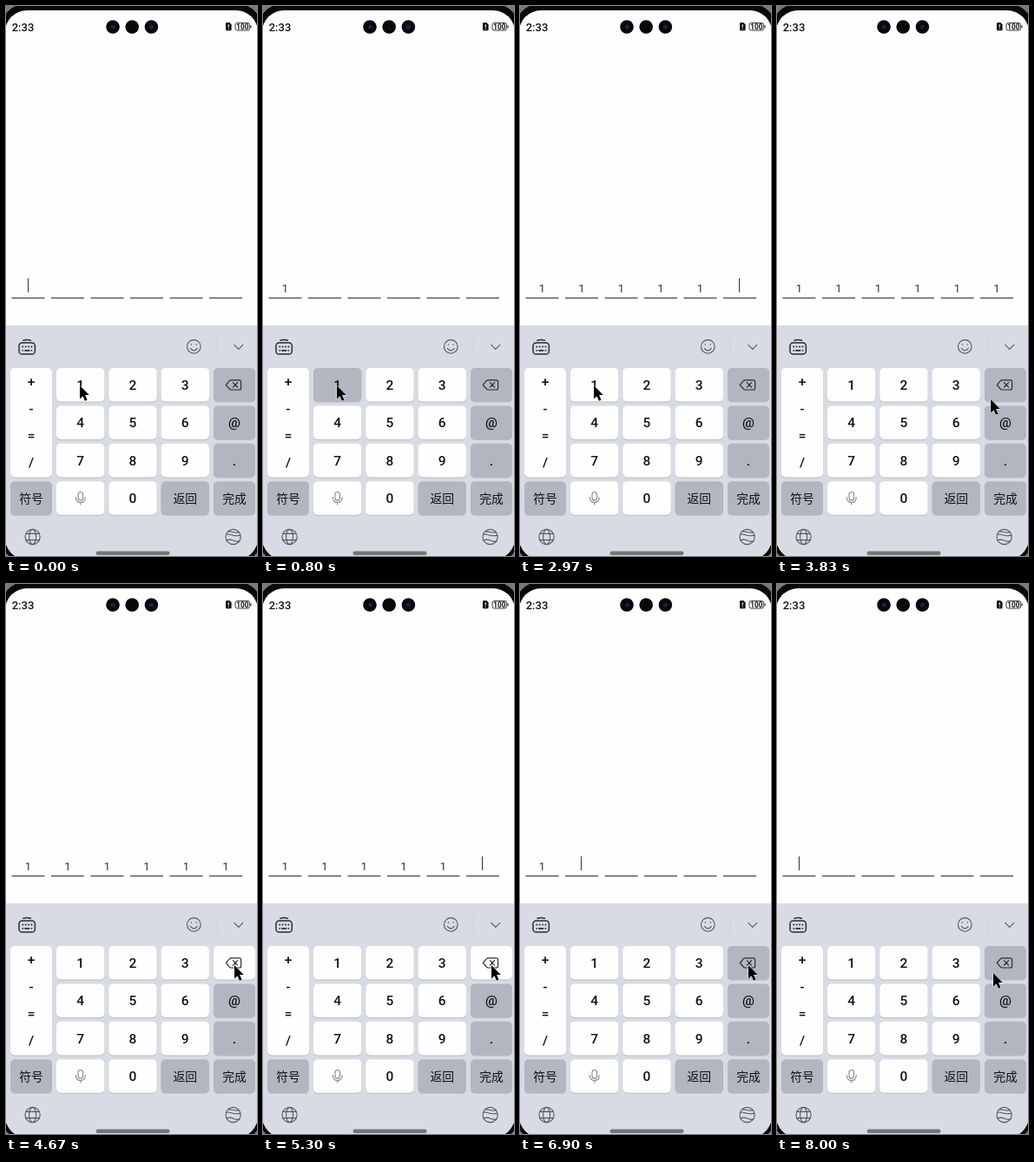
These frames come from a looping animation (289 px wide and 632 px high, 8.03 s). An HTML page:

```html
<!DOCTYPE html>
<html lang="zh">
<head>
<meta charset="utf-8">
<title>Code input</title>
<style>
  html, body { margin: 0; width: 100%; height: 100%; overflow: hidden; background: #000; }
  svg { display: block; width: 100%; height: 100%; }
  text { font-family: Roboto, "Noto Sans CJK SC", "Noto Sans CJK", sans-serif; text-anchor: middle; fill: #111; }
  .label { font-size: 15.5px; font-weight: 500; }
  .cjk { font-size: 13.8px; font-weight: 500; }
  .digit { font-size: 13px; fill: #333; }
  .icon { fill: none; stroke: #2b2d31; stroke-width: 1.2; stroke-linecap: round; stroke-linejoin: round; }
  .thin { stroke: #55585e; stroke-width: 1.1; }
  #arrow { animation: travel 8030ms linear infinite; }
  @keyframes travel {
    0%, 43.5% { transform: translate(85px, 436px); }
    44.4% { transform: translate(112px, 445px); }
    45.4% { transform: translate(162px, 455px); }
    46.6% { transform: translate(215px, 457px); }
    47.7% { transform: translate(246px, 452px); }
    49.4% { transform: translate(259px, 442px); }
    51.4%, 97.8% { transform: translate(263px, 438px); }
    99.6% { transform: translate(249px, 447px); }
    99.99% { transform: translate(249px, 447px); }
    100% { transform: translate(85px, 436px); }
  }
</style>
</head>
<body>
<svg viewBox="0 0 289 632" preserveAspectRatio="none">
  <defs>
    <clipPath id="screen"><rect x="-1" y="5" width="291" height="631" rx="25"/></clipPath>
  </defs>
  <rect width="289" height="632" fill="#77797c"/>
  <rect x="-6" y="-3" width="301" height="643" rx="30" fill="#08080a"/>
  <g clip-path="url(#screen)">
    <rect width="289" height="632" fill="#fefefe"/>
    <rect y="367" width="289" height="265" fill="#d8dbe3"/>
  </g>

  <!-- status bar -->
  <text x="19.5" y="28.6" font-size="13" font-weight="500" textLength="0">2:33</text>
  <g fill="#07080c">
    <circle cx="123" cy="24" r="7.8"/><circle cx="145.2" cy="24" r="7.8"/><circle cx="167.4" cy="24" r="7.8"/>
  </g>
  <g fill="#17243a">
    <circle cx="123.5" cy="24" r="2.6"/><circle cx="167.4" cy="24" r="2.6"/>
  </g>
  <path d="M253 20.2q0-1.2 1.2-1.2h3.2l2.2 2.2v5.9q0 1.2-1.2 1.2h-4.2q-1.2 0-1.2-1.2z" fill="#111"/>
  <path d="M256.3 21.2v3.2M256.3 25.7v1" stroke="#fff" stroke-width="1.1"/>
  <rect x="264" y="19.4" width="16.6" height="8.6" rx="2.4" fill="none" stroke="#222" stroke-width=".9"/>
  <path d="M282 22.2v3" stroke="#222" stroke-width="1.1"/>
  <text x="272.3" y="26.7" font-size="8.2" font-weight="700">100</text>

  <g id="cells"></g>
  <rect id="caret" y="313" width="1" height="16" fill="#333"/>

  <!-- toolbar -->
  <g class="icon" stroke-width="1.5">
    <rect x="15" y="387" width="18.4" height="13" rx="3.6" stroke-width="1.5"/>
    <path d="M20 384.2q4.2-1.4 8.4 0" stroke-width="1.5"/>
    <path d="M19.2 391.5h.1M22.6 391.5h.1M26 391.5h.1M29.4 391.5h.1M19.2 395.8h.1M22 395.8h4.6M29.4 395.8h.1" stroke-width="1.8"/>
  </g>
  <g class="icon thin">
    <circle cx="216.3" cy="391.4" r="7.8"/>
    <path d="M212.3 393.4q4 5 8 0M213.4 388.6v.6M219.2 388.6v.6"/>
    <path d="M262.8 389.4l5 5 5-5"/>
  </g>
  <path d="M242 381v21" stroke="#cdd0d8"/>

  <g id="keys"></g>

  <path class="icon" d="M253.3 435.4l4.1-4.8q.7-.8 1.8-.8h9.4q2 0 2 2v7.2q0 2-2 2h-9.4q-1.1 0-1.8-.8zM261.4 432.7l5.2 5.4M266.6 432.7l-5.2 5.4"/>
  <g class="icon" style="stroke:#85878c;stroke-width:1.1">
    <rect x="83" y="558.5" width="5.6" height="9.6" rx="2.8"/>
    <path d="M80.4 564.5q0 6 5.4 6t5.4-6M85.8 570.6v2.4"/>
  </g>

  <!-- bottom row -->
  <g class="icon thin">
    <circle cx="30.6" cy="610" r="8.6"/>
    <ellipse cx="30.6" cy="610" rx="4" ry="8.6"/>
    <path d="M23 606.4h15.2M23 613.6h15.2"/>
    <circle cx="261.6" cy="610" r="8.6"/>
    <path d="M253.4 607.6c5-2.6 7 3.4 16.6.5M254.2 614.2c5-3.8 8 2.8 14.4.9M256 603.6c4 0 6 2.6 12 1"/>
  </g>
  <rect x="103.5" y="626.6" width="85" height="4.4" rx="2.2" fill="#74767b"/>

  <path id="arrow" d="M0 0V15.4L3.5 12.2 5.9 17.8 8.5 16.7 6.1 11.1H10.8Z" fill="#000" stroke="#fff" stroke-width="1" paint-order="stroke"/>
</svg>
<script>
  const LOOP = 8030, PITCH = 45.5, WHITE = '#fefefe', GREY = '#b1b6c0';
  const $ = id => document.getElementById(id);

  function add(parent, tag, attrs, label) {
    const el = document.createElementNS('http://www.w3.org/2000/svg', tag);
    for (const k in attrs) el.setAttribute(k, attrs[k]);
    if (label) el.textContent = label;
    parent.append(el);
    return el;
  }

  function addKey(x, y, w, h, fill, label = '', cls = 'label') {
    const box = { x, width: w, height: h, rx: 5 };
    add($('keys'), 'rect', { ...box, y: y + 1, fill: '#b9bcc5' });
    const face = add($('keys'), 'rect', { ...box, y, fill });
    if (label) add($('keys'), 'text', { x: x + w / 2, y: y + h / 2 + (cls === 'cjk' ? 5.2 : 5.5), class: cls }, label);
    return face;
  }

  const digits = Array.from({ length: 6 }, (_, i) => {
    const x = 6.5 + PITCH * i;
    add($('cells'), 'rect', { x, y: 335, width: 38, height: 1.1, fill: '#3a3a3a' });
    return add($('cells'), 'text', { x: x + 19, y: 329, class: 'digit' }, '1');
  });

  const rowY = r => 416 + 43.4 * r;
  addKey(5, 416, 48, 125.5, WHITE);
  ['+', '-', '=', '/'].forEach((s, i) =>
    add($('keys'), 'text', { x: 29, y: 436.5 + 31.2 * i, class: 'label' }, s));

  const pad = [];
  for (let i = 0; i < 9; i++)
    pad.push(addKey(58 + 60.3 * (i % 3), rowY(Math.floor(i / 3)), 55.3, 38.6, WHITE, String(i + 1)));
  const erase = addKey(239, rowY(0), 48, 38.6, GREY);
  addKey(239, rowY(1), 48, 38.6, GREY, '@');
  addKey(239, rowY(2), 48, 38.6, GREY, '.');
  addKey(5, rowY(3), 48, 38.6, GREY, '符号', 'cjk');
  addKey(58, rowY(3), 55.3, 38.6, WHITE);
  addKey(118.3, rowY(3), 55.3, 38.6, WHITE, '0');
  addKey(178.6, rowY(3), 55.3, 38.6, GREY, '返回', 'cjk');
  addKey(239, rowY(3), 48, 38.6, GREY, '完成', 'cjk');

  // key presses: [down, edit, up]
  const typed = [[430, 500, 530], [800, 900, 930], [1270, 1370, 1400],
                 [1670, 1770, 1800], [2400, 2500, 2530], [3170, 3270, 3300]];
  const erased = [[4670, 4770, 4800], [5300, 5400, 5430], [5700, 5800, 5830],
                  [6170, 6300, 6330], [6600, 6700, 6730], [7230, 7370, 7400]];
  // caret blinks: [on, off, cell]
  const blinks = [[0, 500, 0], [1100, 1370, 2], [2030, 2500, 4], [2970, 3270, 5],
                  [4900, 5400, 5], [5900, 6300, 3], [6900, 7370, 1], [7870, LOOP, 0]];

  const isDown = (list, t) => list.some(([a, , b]) => t >= a && t < b);
  const edits = (list, t) => list.filter(p => t >= p[1]).length;
  const travel = $('arrow').getAnimations()[0];
  const start = performance.now();
  if (travel) travel.startTime = start;

  function draw(now) {
    const t = Math.max(0, now - start) % LOOP;
    const count = edits(typed, t) - edits(erased, t);
    digits.forEach((d, i) => d.setAttribute('visibility', i < count ? 'visible' : 'hidden'));
    pad[0].setAttribute('fill', isDown(typed, t) ? GREY : WHITE);
    erase.setAttribute('fill', isDown(erased, t) ? WHITE : GREY);
    const blink = blinks.find(([on, off]) => t >= on && t < off);
    $('caret').setAttribute('visibility', blink ? 'visible' : 'hidden');
    if (blink) $('caret').setAttribute('x', 25 + Math.floor(PITCH * blink[2]));
  }

  draw(start);
  requestAnimationFrame(function tick() {
    draw(performance.now());
    requestAnimationFrame(tick);
  });
</script>
</body>
</html>
```
